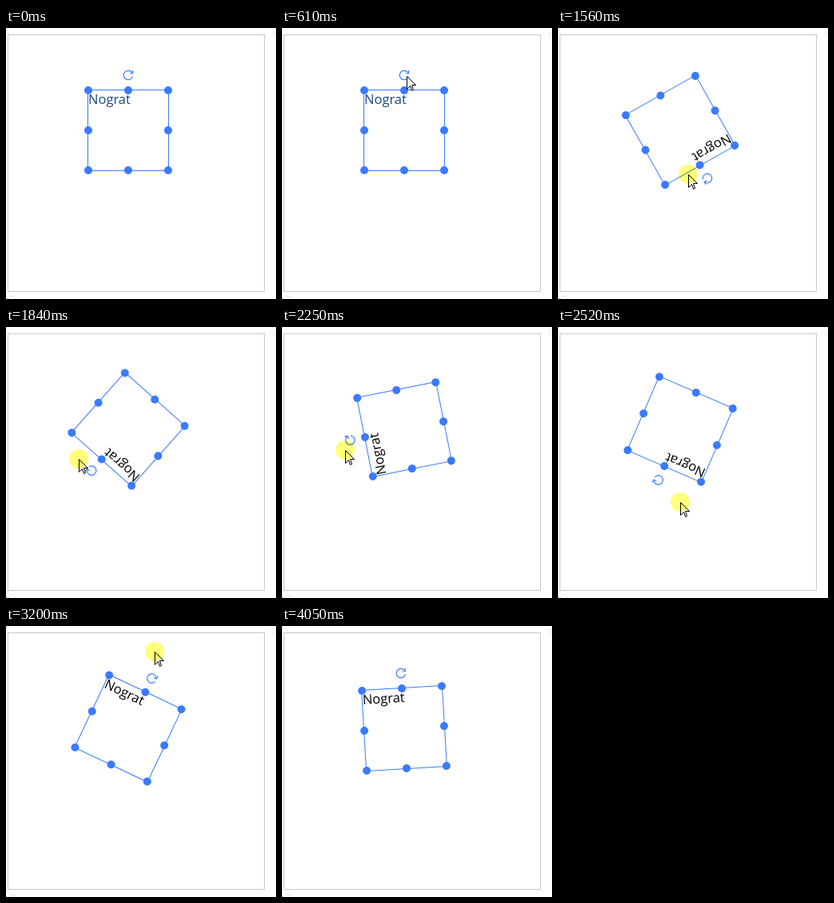
Write an HTML page with a canvas that moves like this. It is 338x339 px and loops after 4.58 s.

```html
<!DOCTYPE html>
<html lang="en">
<head>
<meta charset="utf-8">
<title>Rotating a box by its handle</title>
<style>
  html, body { margin: 0; width: 100%; height: 100%; overflow: hidden; background: #fff; }
  canvas { display: block; width: 338px; height: 339px; }
</style>
</head>
<body>
<canvas id="stage"></canvas>
<script>
const W = 338, H = 339, LOOP = 4580, STEP = 70;
const CX = 153, CY = 128, BLUE = '#3a7afe';
const PRESS = 870, RELEASE = 3840, GONE = 4050;
const canvas = document.getElementById('stage');
const ctx = canvas.getContext('2d');
const ratio = window.devicePixelRatio || 1;
canvas.width = W * ratio;
canvas.height = H * ratio;

// The picture advances in steps, counted afresh from each of these times
const starts = [0, 70, PRESS, 1420, 2250, 2780, 3350, RELEASE];

// The drag around the box centre: [time, degrees from the top, radius]
const drag = [
  [PRESS, 2.5, 68], [1370, 117.6, 95], [1560, 169.7, 56], [1920, 258.7, 77],
  [2225, 258.7, 77], [2780, 72.5, 109.2], [3130, 25.3, 102], [3450, -3.4, 98]
];

const mix = (a, b, k) => a + (b - a) * k;
const clamp = k => Math.min(1, Math.max(0, k));
const radians = deg => deg * Math.PI / 180;

function stepTime(time) {
  const start = starts.filter(s => s <= time).pop();
  return start + Math.floor((time - start) / STEP) * STEP;
}

function dragAt(t) {
  const i = Math.max(1, drag.findIndex(key => key[0] > t));
  const [a, b] = t >= drag.at(-1)[0] ? drag.slice(-2) : [drag[i - 1], drag[i]];
  const k = clamp((t - a[0]) / (b[0] - a[0]));
  return { angle: mix(a[1], b[1], k), radius: mix(a[2], b[2], k) };
}

function pointerAt(t) {
  const { angle, radius } = dragAt(t);
  const x = CX + radius * Math.sin(radians(angle));
  const y = CY - radius * Math.cos(radians(angle));
  const arrive = 1 - (1 - clamp((t - 70) / 490)) ** 2;
  const leave = clamp((t - RELEASE) / 140);
  return [mix(mix(259, x, arrive), 316, leave), mix(mix(223, y, arrive), 309, leave)];
}

// The box follows the pointer one step late
const boxAngle = t => t < PRESS + STEP ? 0 : dragAt(t - STEP).angle;

function disc(x, y, r, color) {
  ctx.fillStyle = color;
  ctx.beginPath();
  ctx.arc(x, y, r, 0, Math.PI * 2);
  ctx.fill();
}

function polyline(...points) {
  ctx.beginPath();
  for (const [x, y] of points) ctx.lineTo(x, y);
}

function drawPage() {
  ctx.fillStyle = '#fff';
  ctx.fillRect(0, 0, W, H);
  ctx.lineWidth = 1;
  ctx.strokeStyle = '#c8c8c8';
  ctx.strokeRect(2.5, 8.5, 321, 321);
  // Faint crumbs at the page edges
  ctx.strokeStyle = '#e2e2e2';
  polyline([0, 338.5], [4, 338.5]);
  ctx.stroke();
  polyline([5, 334], [7, 337], [9, 335], [12, 338]);
  ctx.stroke();
  ctx.beginPath();
  ctx.arc(337.5, 7.5, 3, Math.PI / 2, Math.PI * 1.5);
  ctx.stroke();
}

function drawHandle() {
  ctx.lineWidth = 1.2;
  ctx.beginPath();
  ctx.arc(0, -69, 5.7, 0.3, Math.PI * 2 - 0.5);
  ctx.stroke();
  polyline([5.6, -75], [5.6, -71], [1.8, -71]);
  ctx.stroke();
}

function drawBox(angle) {
  ctx.save();
  ctx.translate(CX, CY);
  ctx.rotate(radians(angle));
  ctx.fillStyle = angle ? '#000' : '#17477f';
  ctx.font = '16.5px "Open Sans", "Noto Sans", sans-serif';
  ctx.fillText('Nograt', -50, -33);
  ctx.strokeStyle = BLUE;
  ctx.lineWidth = 1;
  ctx.strokeRect(-50.5, -50.5, 101, 101);
  drawHandle();
  for (const x of [-50, 0, 50]) {
    for (const y of [-50, 0, 50]) {
      if (x || y) disc(x, y, 5, BLUE);
    }
  }
  ctx.restore();
}

function drawPointer([x, y], pressed) {
  ctx.save();
  ctx.translate(Math.round(x) + 0.5, Math.round(y) + 0.5);
  polyline([0, 0], [0, 16], [4, 12], [6, 18], [8, 17], [6, 11], [11, 11]);
  ctx.closePath();
  ctx.fillStyle = '#fff';
  ctx.fill();
  ctx.strokeStyle = '#000';
  ctx.lineWidth = 1;
  ctx.stroke();
  if (pressed) {
    // The highlight tints the pointer too
    ctx.globalCompositeOperation = 'multiply';
    disc(-0.5, -0.5, 12, '#ffff7a');
  }
  ctx.restore();
}

function draw(time) {
  const t = stepTime(time);
  ctx.setTransform(ratio, 0, 0, ratio, 0, 0);
  drawPage();
  drawBox(boxAngle(t));
  if (t >= 70 && t < GONE) drawPointer(pointerAt(t), t >= PRESS && t < RELEASE);
}

const start = performance.now();
function loop() {
  draw((performance.now() - start) % LOOP);
  requestAnimationFrame(loop);
}
loop();
</script>
</body>
</html>
```
